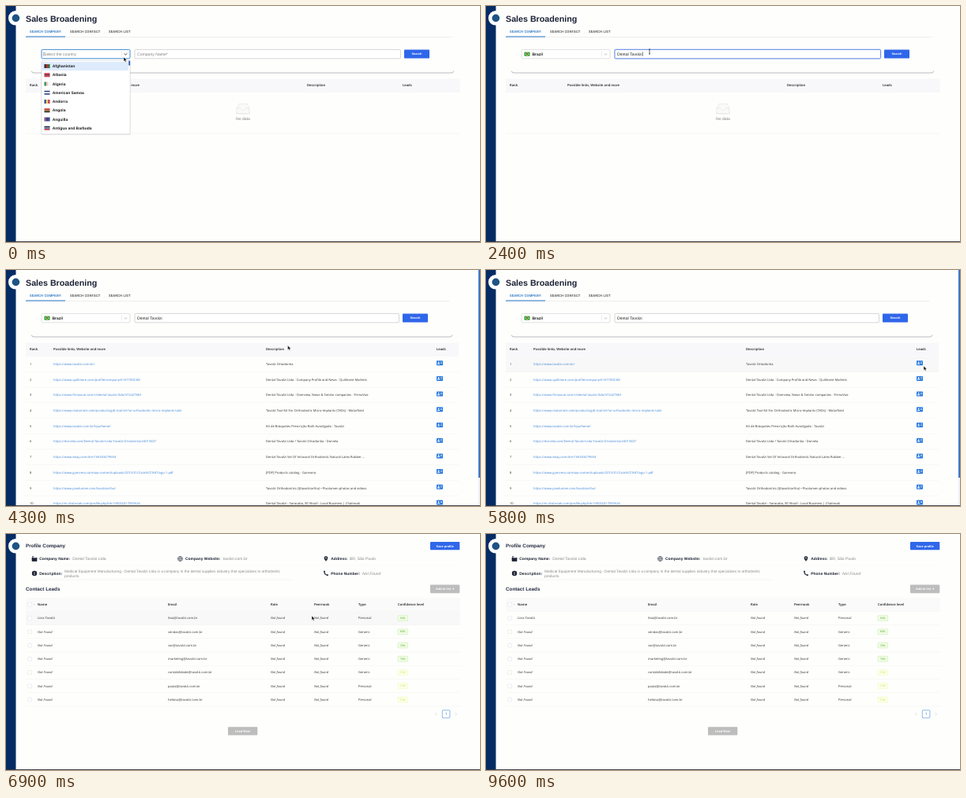
These frames come from a looping animation (600x300 px, 9700 ms). An HTML page:

```html
<!DOCTYPE html>
<html lang="en">
<head>
<meta charset="utf-8">
<title>Sales Broadening</title>
<style>
  html, body { margin: 0; width: 100%; height: 100%; overflow: hidden; background: #fefefd; }
  svg { display: block; width: 600px; height: 300px; }
  text { font: 5.1px "Liberation Sans", Arial, sans-serif; fill: #222; text-rendering: geometricPrecision; white-space: pre; }
  .title { font-size: 10.7px; font-weight: 700; fill: #1c2233; }
  .sub { font-size: 6.3px; font-weight: 700; fill: #222b3c; }
  .tab { font: 500 4.3px Roboto, sans-serif; letter-spacing: .03em; fill: #444; }
  .tab.on { fill: #1f6fc4; }
  .opt { font-size: 4.95px; font-weight: 700; fill: #1a1a1a; }
  .hint { fill: #808080; }
  .label { font-size: 4.95px; font-weight: 700; fill: #1d2433; }
  .value { font-size: 5px; fill: #8a8a8a; }
  .desc { font-size: 4.75px; }
  .head { font: 600 4.2px "Open Sans", sans-serif; fill: #1e1e1e; }
  .cell { font: 4.05px "Open Sans", sans-serif; fill: #333; }
  .link { fill: #3f86d8; }
  .it { font-style: italic; }
  .btn { font-size: 3.9px; font-weight: 700; fill: #fff; text-anchor: middle; }
  .mid { text-anchor: middle; }
  .tag { font: 3.4px "Open Sans", sans-serif; text-anchor: middle; }
</style>
</head>
<body>
<svg id="stage" viewBox="0 0 600 300"></svg>
<script>
const LOOP = 9700, STEP = 100;
const BLUE = '#2f66ea', GREY = '#bdbdbd', LINE = '#ececec';
const COMPANY = 'Dental Tavolzi';

// Pointer path: time, x, y
const PATH = [
  [0, 149, 65], [200, 146, 68], [500, 80, 76], [600, 80, 76], [900, 204, 58.5], [2400, 207, 58],
  [2800, 520, 61], [3100, 520, 61], [4000, 357, 96], [4700, 356, 96], [5500, 554, 122],
  [6300, 554, 122], [6800, 387, 104], [7300, 387, 104], [8000, 500, 170], [8400, 512, 208],
  [9000, 250, 176], [9400, 300, 130]
];

const COUNTRIES = [
  ['Afghanistan', 'v', '#222', '#a33', '#286b35'],
  ['Albania', 'h', '#c8394a', '#7d2430', '#c8394a'],
  ['Algeria', 'v', '#2d8a45', '#e2c6c6', '#f4f4f4'],
  ['American Samoa', 'h', '#263d7c', '#e8e8ee', '#3a4f8c'],
  ['Andorra', 'v', '#2b449c', '#ecd35a', '#c63a48'],
  ['Angola', 'h', '#c33', '#a8782e', '#222'],
  ['Anguilla', 'v', '#8f4a6b', '#2c418c', '#2c418c'],
  ['Antigua and Barbuda', 'h', '#34232b', '#5f83bd', '#c33a42'],
  ['Brazil'],
  ['Gibraltar', 'h', '#f2f2f2', '#f2f2f2', '#c33']
];

const RESULTS = [
  ['www.tavolzi.com.br/', 'Tavolzi Ortodontia'],
  ['www.quillmere.com/profile/company/6167783Z:BZ', 'Dental Tavolzi Ltda - Company Profile and News - Quillmere Markets'],
  ['www.firmovue.com/c/dental-tavolzi-ltda/372427862', 'Dental Tavolzi Ltda - Overview, News &amp; Similar companies - FirmoVue'],
  ['www.molarnest.com/products/gdt-tool-kit-for-orthodontic-micro-implants-tads', 'Tavolzi Tool Kit For Orthodontic Micro-Implants (TADs) - MolarNest'],
  ['www.tavolzi.com.br/loja/home/', 'Kit de Bráquetes Prescrição Roth Autoligado - Tavolzi'],
  ['dorvela.com/Dental-Tavolzi-Ltda-Tavolzi-Ortodontia/24015607', 'Dental Tavolzi Ltda / Tavolzi Ortodontia - Dorvela'],
  ['www.ebay.com/itm/166553479694', 'Dental Tavolzi Set Of Intraoral Orthodontic Natural Latex Rubber ...'],
  ['www.gumvera.com/wp-content/uploads/2015/01/Cata%CC%81logo-1.pdf', '[PDF] Products catalog - Gumvera'],
  ['www.pixolumen.com/tavolziortho/', 'Tavolzi Orthodontics (@tavolziortho) • Pixolumen photos and videos'],
  ['m.chatnook.com/profile.php?id=100002417093526', 'Dental Tavolzi - Sorocaba, SP, Brazil - Local Business | Chatnook']
];

const LEADS = [
  ['livia', 'Personal', 94], ['vendas', 'Generic', 80], ['sac', 'Generic', 78], ['marketing', 'Generic', 78],
  ['contabilidade', 'Generic', 15], ['paula', 'Personal', 15], ['heloisa', 'Personal', 15]
];

const text = (x, y, s, cls = '') => `<text x="${x}" y="${y}" dy=".35em" class="${cls}">${s}</text>`;
const rect = (x, y, w, h, fill, more = '') => `<rect x="${x}" y="${y}" width="${w}" height="${h}" fill="${fill}" ${more}/>`;
const path = (d, stroke, w = .6, fill = 'none') => `<path d="${d}" stroke="${stroke}" stroke-width="${w}" fill="${fill}"/>`;
const circle = (x, y, r, fill, more = '') => `<circle cx="${x}" cy="${y}" r="${r}" fill="${fill}" ${more}/>`;
const box = (x, y, w, h, stroke, sw = .6) => rect(x, y, w, h, '#fff', `rx="1.5" stroke="${stroke}" stroke-width="${sw}"`);
const button = (x, y, w, h, s, fill) => rect(x, y, w, h, fill, 'rx="1"') + text(x + w / 2, y + h / 2, s, 'btn');
const heads = (y, list) => list.map(([x, s]) => text(x, y, s, 'head')).join('');

function pointerAt(t) {
  const i = PATH.findIndex(k => k[0] > t);
  if (i < 0) return PATH[PATH.length - 1].slice(1);
  const [t0, x0, y0] = PATH[i - 1], [t1, x1, y1] = PATH[i];
  const p = (t - t0) / (t1 - t0), e = p * p * (3 - 2 * p);
  return [x0 + (x1 - x0) * e, y0 + (y1 - y0) * e];
}

function pointer(t) {
  if (t >= 9500) return '';
  const [x, y] = pointerAt(t);
  const d = t >= 800 && t < 2500
    ? path('M-1-3H1M0-3V3M-1 3H1', '#333', .8)
    : path('M0 0V5.4L1.3 4.3 2.2 6.2 3.2 5.7 2.4 3.9H4Z', '#fff', .4, '#111');
  return `<g transform="translate(${x} ${y})">${d}</g>`;
}

function flag(x, y, [name, dir, ...colors]) {
  if (name === 'Brazil') {
    return rect(x, y, 7, 5, '#27a043') + path(`M${x + .8} ${y + 2.5}l2.7-1.9 2.7 1.9-2.7 1.9z`, 'none', 0, '#f2d530') +
      circle(x + 3.5, y + 2.5, 1, '#29478f');
  }
  return colors.map((c, i) => dir === 'v'
    ? rect(x + i * 7 / 3, y, 7 / 3, 5, c)
    : rect(x, y + i * 5 / 3, 7, 5 / 3, c)).join('');
}

function dropdown(query) {
  const list = COUNTRIES.filter(c => c[0].toLowerCase().includes(query)).slice(0, 8);
  const h = list.length * 11.25 + 3.5;
  return rect(44.5, 69.5, 113, h + .8, '#000', 'opacity=".12" rx="1.5"') +
    rect(45, 69.3, 112, h, '#fff', 'rx="1.5" stroke="#ccc" stroke-width=".4"') +
    rect(45, 71, 110, 11, '#deebfc') +
    (query ? '' : rect(155.3, 69.5, 1.8, 6, '#2c5fae')) +
    list.map((c, i) => flag(48.5, 74 + i * 11.25, c) + text(58.7, 76.4 + i * 11.25, c[0], 'opt')).join('');
}

function form(t, wide) {
  const shift = wide ? 0 : 2, open = t < 600, active = t < 1000;
  const query = 'bra'.slice(0, Math.max(0, t / STEP - 2));
  const typed = COMPANY.slice(0, Math.max(0, Math.floor((t - 900) / STEP)));
  const focus = t >= 800 && t < 2800;
  const dark = active ? '#333' : '#b5b5b5';
  let s = text(25, 16, 'Sales Broadening', 'title') +
    text(30, 32, 'SEARCH COMPANY', 'tab on') + text(81, 32, 'SEARCH CONTACT', 'tab') + text(130, 32, 'SEARCH LIST', 'tab') +
    rect(25, 39.1, 539 - shift * 1.3, .5, '#ddd') + rect(25, 38.5, 50, 1, '#2b78c8');

  s += box(45, 55.4, 112, 11.4, active ? '#2c7fd0' : '#ccc', active ? .9 : .6) +
    rect(146, 57.5, .4, 7.2, '#d0d0d0') + path('M149.6 60.3l1.9 1.8 1.9-1.8', dark, .9);
  if (!open) s += flag(48.5, 58.6, ['Brazil']) + text(58.5, 61, 'Brazil', 'opt');
  else s += query ? text(48, 61, query) : text(48, 61, 'Select the country', 'hint') + rect(47.7, 58.3, .4, 5.4, '#333');

  const w = 336.5 - shift;
  if (focus) s += rect(162, 54.4, w + 2, 13.4, '#cfdcfb', 'rx="2.2"');
  s += box(163, 55.4, w, 11.4, focus ? '#4c78dd' : '#bbb', focus ? .8 : .6) +
    (typed ? text(166, 61, typed) : text(166, 61, 'Company Name*', 'hint'));
  if (focus && t >= 900) {
    const caret = typed ? 166.2 + typed.length * 2.28 : 166;
    s += rect(caret, 58.2, .5, 5.6, '#222');
  }
  s += button(504 - shift, 55.5, 32, 11, 'Search', BLUE) +
    path(`M32.5 82.5Q32.5 85 35 85H${564 - shift}Q${566.5 - shift} 85 ${566.5 - shift} 82.5`, '#a9a9ad', .8);
  return s;
}

function emptyTable(t) {
  return rect(25, 92.5, 550, 17.5, '#f8f8fa') +
    heads(101, [[30, 'Rank'], [103, 'Possible links, Website and more'], [381, 'Description'], [502, 'Leads']]) +
    `<g opacity="${t >= 2900 ? .5 : 1}">` +
    `<ellipse cx="300" cy="136" rx="9.5" ry="2.2" fill="#f3f3f3"/>` +
    path('M292 130l3-5.5h10l3 5.5v6.5h-16zM292 130h5q.5 2.5 3 2.5t3-2.5h5', '#dadada', .5, '#fafafa') +
    text(300, 143.3, 'No data', 'hint mid') + '</g>' + rect(25, 161.8, 550, .5, LINE);
}

function resultTable(t) {
  const y = pointerAt(t)[1];
  return rect(25, 92.5, 548, 17.2, '#f8f8fa') +
    heads(101, [[30, 'Rank'], [60, 'Possible links, Website and more'], [329, 'Description'], [545, 'Leads']]) +
    RESULTS.map(([url, about], i) => {
      const top = 109.7 + i * 19.7, m = top + 9.8, hover = y > top && y < top + 19.7;
      return (hover ? rect(25, top, 548, 19.7, '#f8f8f8') : '') + rect(25, top + 19.5, 548, .4, LINE) +
        text(30, m, i + 1, 'cell') + text(60, m, 'https://' + url, 'cell link') + text(329, m, about, 'cell') +
        rect(545, m - 4.3, 8, 6, '#2879df', 'rx=".7"') + circle(547.6, m - 2.2, .9, '#fff') +
        rect(546, m - .9, 3.2, 1.2, '#fff', 'rx=".5"') + rect(550, m - 2.8, 2, .6, '#fff') + rect(550, m - 1.3, 2, .6, '#fff');
    }).join('') + rect(597.8, 0, 2.2, 300, '#eef0f4') + rect(598, 0, 2, 264, '#3f76c8');
}

function info() {
  const dark = '#1d2433';
  const icons =
    path('M33 34.5V30h2v1.5l2-1.5v1.5l2-1.5v4.5zM33 28.5h2', dark, .7, dark) +
    circle(36, 50, 3.2, dark) + rect(35.6, 49.4, .8, 2.5, '#fff') + rect(35.6, 48, .8, .8, '#fff') +
    circle(220.5, 31.5, 2.9, 'none', `stroke="${dark}" stroke-width=".7"`) +
    path('M217.6 31.5h5.8M220.5 28.6q-2.6 2.9 0 5.8q2.6-2.9 0-5.8', dark, .5) +
    path('M405 34.8q-2.4-2.8-2.4-4.2a2.4 2.4 0 0 1 4.8 0q0 1.4-2.4 4.2', 'none', 0, dark) + circle(405, 30.6, .8, '#fff') +
    path('M402.9 47.6q.1 4.7 4.8 4.9', dark, 1.2) + path('M402.2 47.5h1.7M406 52.3l1.9-.5', dark, 1.3);
  return icons +
    text(42.3, 31.5, 'Company Name:', 'label') + text(84.3, 31.5, COMPANY + ' Ltda', 'value') +
    text(227, 31.5, 'Company Website:', 'label') + text(274.5, 31.5, 'tavolzi.com.br', 'value') +
    text(411.3, 31.5, 'Address:', 'label') + text(435, 31.5, 'BR, São Paulo', 'value') +
    text(42.3, 50, 'Description:', 'label') +
    text(74, 47.4, `Medical Equipment Manufacturing - ${COMPANY} Ltda is a company in the dental supplies industry that specializes in orthodontic`, 'value desc') +
    text(74, 52.9, 'products.', 'value desc') +
    text(411.3, 50, 'Phone Number:', 'label') + text(451, 50, 'Not Found', 'value it') +
    rect(32, 57.8, 330, .4, '#e8e8e8') + rect(32, 39.2, 535, .3, '#f2f2f2');
}

function leadRow([user, type, score], i, y) {
  const top = 98.3 + i * 17.25, m = top + 8.7, hover = y > top && y < top + 17.25;
  const [bg, edge, ink] = score > 50 ? ['#f1fde6', '#b5e98f', '#4ea62a'] : ['#fcffe6', '#eaf8a0', '#b3d95a'];
  return (hover ? rect(25, top, 550, 17.25, '#f8f8f8') : '') + rect(25, top + 17, 550, .4, LINE) +
    rect(27.7, m - 2.4, 4.8, 4.8, '#fff', 'rx=".7" stroke="#d4d4d4" stroke-width=".4"') +
    (i ? text(40, m, 'Not Found', 'cell it') : text(40, m, 'Livia Tavolzi', 'cell')) +
    text(205, m, user + '@tavolzi.com.br', 'cell') +
    text(335, m, 'Not found', 'cell it') + text(390, m, 'Not found', 'cell it') + text(446, m, type, 'cell') +
    rect(496, m - 3.4, 12.5, 6.8, bg, `rx="1" stroke="${edge}" stroke-width=".4"`) +
    `<text x="502.2" y="${m}" dy=".35em" class="tag" style="fill:${ink}">${score}%</text>`;
}

function profile(t) {
  const y = t < 9500 ? pointerAt(t)[1] : 0;
  return text(25, 15.2, 'Profile Company', 'sub') + button(537, 10, 37.3, 10.3, 'Save profile', BLUE) + info() +
    text(25, 70, 'Contact Leads', 'sub') + button(537, 64.5, 37.3, 10.7, 'Add to list  ▾', GREY) +
    rect(25, 81, 550, 17.3, '#fafafa') + rect(25, 98.1, 550, .4, LINE) +
    rect(27.7, 87.2, 4.8, 4.8, '#fff', 'rx=".7" stroke="#d4d4d4" stroke-width=".4"') + path('M34.6 89l1 1 1-1', '#aaa', .4) +
    heads(89.7, [[40, 'Name'], [205, 'Email'], [335, 'Role'], [390, 'Peernook'], [446, 'Type'], [496, 'Confidence level']]) +
    LEADS.map((lead, i) => leadRow(lead, i, y)).join('') +
    path('M545 227.2l-1.6 1.7 1.6 1.7M568.8 227.2l1.6 1.7-1.6 1.7', '#bbb', .5) +
    rect(552.3, 224, 9.6, 9.8, '#fff', 'rx="1" stroke="#3f86d8" stroke-width=".6"') +
    `<text x="557.1" y="229" dy=".35em" class="tag" style="fill:#2f78d0;font-weight:600;font-size:4px">1</text>` +
    button(281, 245.3, 37.3, 10.5, 'Load More', GREY);
}

function frame() {
  return rect(0, 0, 12.5, 300, '#042b63') + circle(12.3, 15.3, 9.3, '#fff') + circle(12.4, 15.4, 4.8, '#1e5482') +
    rect(0, 299.1, 600, .9, '#33363c');
}

function page(t) {
  if (t < 3500) return form(t, true) + emptyTable(t) + (t < 600 ? dropdown('bra'.slice(0, Math.max(0, t / STEP - 2))) : '');
  if (t < 6200) return form(t, false) + resultTable(t);
  return t < 6500 ? '' : profile(t);
}

const stage = document.getElementById('stage');
let shown = -1;
function draw() {
  const t = Math.floor(performance.now() % LOOP / STEP) * STEP;
  if (t !== shown) {
    shown = t;
    stage.innerHTML = rect(0, 0, 600, 300, '#fefefd') + page(t) + frame() + pointer(t);
  }
  requestAnimationFrame(draw);
}
draw();
</script>
</body>
</html>
```
